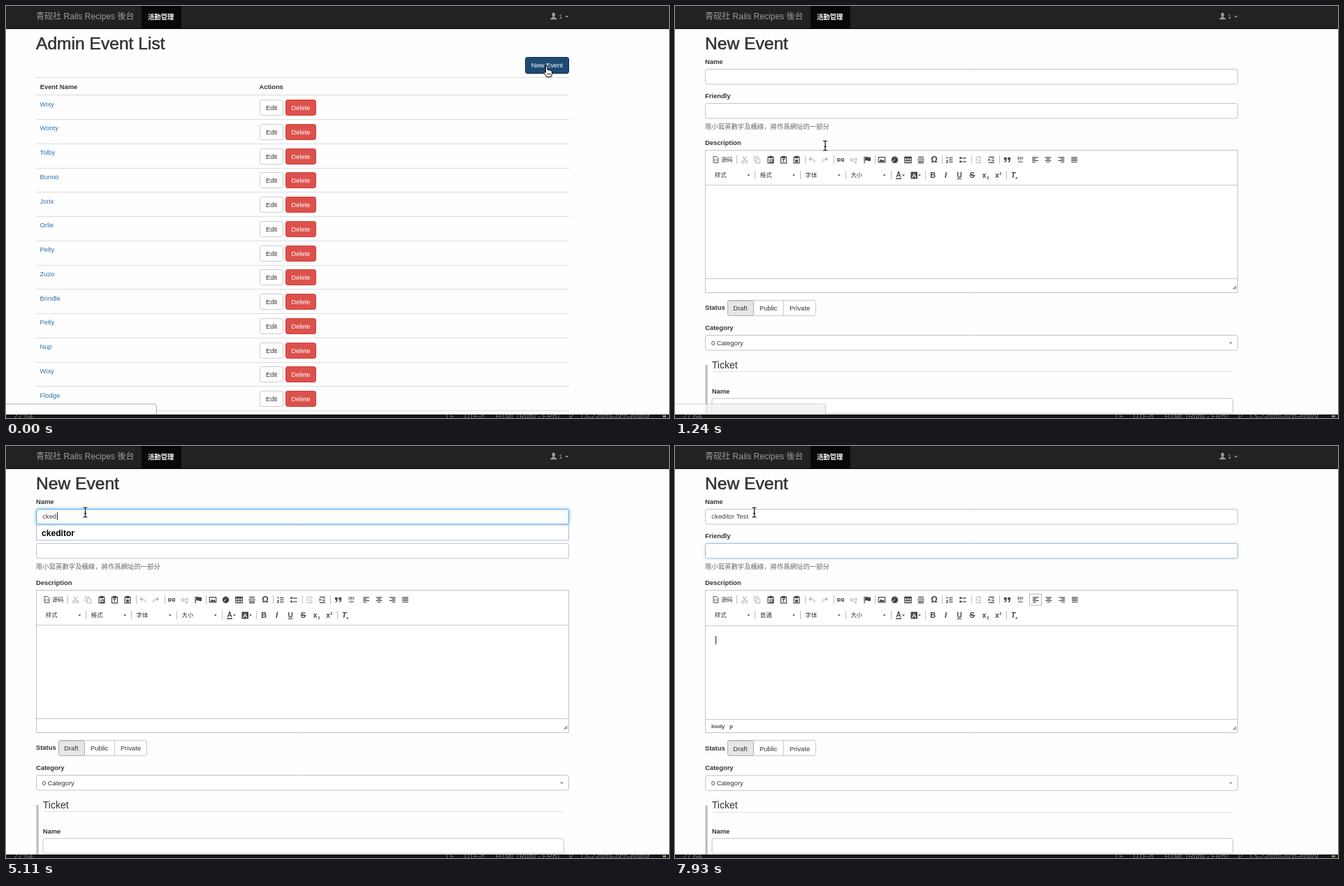
An HTML page with a canvas for the animation above (8 s loop, 949 px wide and 590 px high).

```html
<!DOCTYPE html>
<html lang="zh">
<head>
<meta charset="utf-8">
<title>Admin event form</title>
<style>
html, body { margin: 0; width: 100%; height: 100%; overflow: hidden; background: #fefefe; }
canvas { display: block; width: 949px; height: 590px; }
</style>
</head>
<body>
<canvas id="stage" width="949" height="590"></canvas>
<script>
const ctx = document.getElementById('stage').getContext('2d');
const LOOP = 8000;
const FONT = '"Liberation Sans", "Noto Sans CJK SC", "Noto Sans CJK", sans-serif';
const BODY = 9.37;
const INK = '#333', LINE = '#c8c8c8';

const NAMES = ['Wixy', 'Wonty', 'Tolby', 'Bunno', 'Jorix', 'Orlie', 'Pelty',
  'Zuzo', 'Brindle', 'Pelty', 'Nup', 'Wixy', 'Flodge'];

// Timed states: each holds until the next one starts.
const CURSOR = [
  [0, 'hand', 773, 86], [150, 'arrow', 773, 86], [800, 'arrow', 700, 98],
  [950, 'arrow', 480, 128], [1100, 'beam', 283, 152], [1240, 'beam', 215, 200],
  [1390, 'beam', 150, 255], [1540, 'beam', 123, 280], [1990, 'beam', 118, 235],
  [2140, 'beam', 110, 150], [2280, 'arrow', 103, 80], [2430, 'beam', 113.5, 95]
];
const TYPED = [[0, ''], [4070, 'ck'], [4960, 'cke'], [5110, 'cked'], [5410, 'ckedi'],
  [5560, 'ckedit'], [5710, 'ckedito'], [5860, 'ckeditor'], [6160, 'ckeditor '],
  [6750, 'ckeditor T'], [6900, 'ckeditor Te'], [7050, 'ckeditor Tes'], [7190, 'ckeditor Test']];
const NAME_FOCUS = [[0, 0], [2730, .5], [2880, 1], [7490, .45], [7640, 0]];
const FRIENDLY_FOCUS = [[0, 0], [7490, .5], [7640, 1], [7930, .3]];
const STATUS_ALPHA = [[0, 1], [1240, .6], [1390, .25], [1540, 0]];
const CARET = [[0, 0], [2730, 1], [3180, 0], [3620, 1], [4520, 0], [4960, 1], [6600, 0], [6750, 1], [7490, 0]];

const at = (list, t) => list.filter(s => s[0] <= t).pop();

function rect(x, y, w, h, color) {
  ctx.fillStyle = color;
  ctx.fillRect(x, y, w, h);
}

function box(x, y, w, h, fill, edge, r = 2.7) {
  ctx.beginPath();
  ctx.roundRect(x + .5, y + .5, w - 1, h - 1, r);
  ctx.fillStyle = fill;
  ctx.fill();
  ctx.strokeStyle = edge;
  ctx.lineWidth = 1;
  ctx.stroke();
}

function text(str, x, y, color = INK, size = BODY, weight = 400, align = 'left') {
  ctx.font = `${weight} ${size}px ${FONT}`;
  ctx.textAlign = align;
  ctx.fillStyle = color;
  ctx.fillText(str, x, y);
}

const label = (str, x, y) => text(str, x, y, INK, BODY, 700);

function shape(d, fill, stroke, width = 1) {
  const p = new Path2D(d);
  if (fill) { ctx.fillStyle = fill; ctx.fill(p); }
  if (stroke) { ctx.strokeStyle = stroke; ctx.lineWidth = width; ctx.stroke(p); }
}

function placed(x, y, draw) {
  ctx.save();
  ctx.translate(x, y);
  draw();
  ctx.restore();
}

const caretDown = (x, y, color, r = 2.6) =>
  placed(x, y, () => shape(`M${-r},${-r / 2}H${r}L0,${r / 2}Z`, color));

function heading(str) {
  text(str, 43, 62, INK, 24.6);
  ctx.strokeStyle = INK;
  ctx.lineWidth = .55;
  ctx.strokeText(str, 43, 62);
}

function navbar() {
  rect(0, 0, 949, 33, '#222');
  rect(0, 32, 949, 1, '#080808');
  text('青砚社 Rails Recipes 後台', 43, 19.3, '#9d9d9d', 12.05);
  rect(194, 0, 57, 32, '#080808');
  text('活動管理', 203, 18.5, '#fff', BODY, 700);
  placed(783.8, 14.5, () => shape(
    'M-2.3,-2.5Q-2.3,-5 0,-5T2.3,-2.5Q2.2,-.5 1.1,.7V1.6L4.6,3.4V4.8H-4.6V3.4L-1.1,1.6V.7Q-2.2,-.5 -2.3,-2.5Z', '#9d9d9d'));
  text('1', 791.3, 18.3, '#9d9d9d');
  caretDown(802.7, 15.5, '#9d9d9d');
}

function footer() {
  rect(0, 585, 949, 5, '#141416');
  ctx.save();
  ctx.beginPath();
  ctx.rect(0, 585, 949, 5);
  ctx.clip();
  const c = '#74777c';
  text('27:64', 11, 591, c, 11);
  text('LF', 630, 591, c, 10.2);
  text('UTF-8', 656, 591, c, 10.2);
  text('HTML (Ruby - ERB)', 701, 591, c, 10.2);
  placed(809, 588, () => shape('M-2,-4V4M2,-3V-1L-2,2', null, c));
  text('13-2-html-rich-editor', 821, 591, c, 11.2);
  rect(940, 586, 5, 3, '#8a8468');
  ctx.restore();
}

function listPage() {
  heading('Admin Event List');
  box(743, 73, 63, 24, '#1d4b75', '#122b40');
  text('New Event', 774.5, 88.3, '#fff', BODY, 400, 'center');
  rect(43, 102, 763, 1, '#ddd');
  label('Event Name', 48.7, 118.5);
  label('Actions', 362.5, 118.5);
  rect(43, 127, 763, 1, '#d8d8d8');
  NAMES.forEach((name, i) => {
    const y = 34.75 * i;
    text(name, 48.5, 143.5 + y, '#2c6fb0');
    box(363, Math.round(134 + y), 34, 23, '#fff', '#ccc');
    text('Edit', 380, 149 + y, INK, BODY, 400, 'center');
    box(400, Math.round(134 + y), 44, 23, '#dc514c', '#d43f3a');
    text('Delete', 422, 149 + y, '#fff', BODY, 400, 'center');
    rect(43, Math.round(162 + y), 763, 1, '#ddd');
  });
}

function input(x, y, w, focus = 0) {
  const mix = (a, b) => Math.round(a + (b - a) * focus);
  ctx.save();
  if (focus) {
    ctx.shadowColor = `rgba(102,175,233,${.7 * focus})`;
    ctx.shadowBlur = 5;
  }
  box(x, y, w, 22.5, '#fff', `rgb(${mix(196, 90)},${mix(196, 170)},${mix(196, 233)})`);
  ctx.restore();
}

const bars = (left, widths, top = -3.5, gap = 2.3) =>
  widths.map((w, i) => `M${left(w)},${top + i * gap}h${w}`).join('');
const ring = x => `M${x + 1.6},3a1.6,1.6 0 1 0 -3.2,0a1.6,1.6 0 1 0 3.2,0`;
const CLIP = 'M-4,-4H4V4.5H-4ZM-2,-5H2V-3H-2Z';
const INDENT = 'M-4,-4H4M0,-1.3H4M0,1.3H4M-4,4H4';
const COMMA = 'h3.8v3.2q0,3 -3,4v-1.6q1.3,-.6 1.3,-2.2h-2.1z';

// Toolbar glyphs as [stroke path, fill path], centred on the origin.
const ICONS = {
  cut: ['M-3,-5L2,1.8M3,-5L-2,1.8' + ring(-2.7) + ring(2.7)],
  copy: ['M-1,2H-4V-4.5H1V-3M-1,-2H2.5L4,0V4.5H-1Z'],
  paste: [CLIP + 'M-1,0H3V3.5H-1Z', 'M-2,-5H2V-3H-2Z'],
  pasteText: [CLIP + 'M-2,-1H2M0,-1V3', 'M-2,-5H2V-3H-2Z'],
  pasteWord: [CLIP + 'M-2,-.5L-1,3L0,0L1,3L2,-.5', 'M-2,-5H2V-3H-2Z'],
  undo: ['M4.5,3.5Q3.5,-1 -2,-1', 'M-5,-1L-1,-4.3V2.3Z'],
  redo: ['M-4.5,3.5Q-3.5,-1 2,-1', 'M5,-1L1,-4.3V2.3Z'],
  link: ['M-.8,-1.8H-4.3V1.8H-.8M.8,-1.8H4.3V1.8H.8M-2.5,0H2.5'],
  unlink: ['M-.8,-1.8H-4.3V1.8H-.8M.8,-1.8H4.3V1M-2.5,0H2.5M1,2L4,5M4,2L1,5'],
  flag: [null, 'M-4.5,-4.8H-3.3V5H-4.5ZM-2.8,-4Q-.5,-5 1,-4T5,-4V1.4Q3,2.4 1,1.3T-2.8,1.4Z'],
  image: ['M-4.7,-3.7H4.7V3.7H-4.7Z', 'M-4,3L-1.3,-1L.7,1L2.3,-.5L4,3Z'],
  flash: [null, 'M4.8,0A4.8,4.8 0 1 0 -4.8,0A4.8,4.8 0 1 0 4.8,0ZM2.8,-3Q.5,-3 -.2,-.5T-2.8,3V1.6Q-1.6,1.5 -1.2,0T2.8,-3Z'],
  table: ['M-4.7,-4H4.7V4.3H-4.7ZM-1.6,-3V4M1.6,-3V4M-4.5,.8H4.5', 'M-5,-4.5H5V-2H-5Z'],
  rule: ['M-4,-4.3H4M-4,-2.3H4M-4.7,0H-2M-1.3,0H1.3M2,0H4.7M-4,2.3H4M-4,4.3H4'],
  numbers: ['M-.8,-3H4.5M-.8,0H4.5M-.8,3H4.5M-3.5,-4.5V-1.5M-4.5,1H-2.8L-4.3,4H-2.5'],
  bullets: ['M-1,-2.5H4.7M-1,2.5H4.7', 'M-4.7,-4H-2V-1.3H-4.7ZM-4.7,1.3H-2V4H-4.7Z'],
  outdent: [INDENT, 'M-5,0L-2,-2V2Z'],
  indent: [INDENT, 'M-1.5,0L-4.5,-2V2Z'],
  quote: [null, 'M-4.6,-3.5' + COMMA + 'M.8,-3.5' + COMMA],
  left: [bars(() => -4.3, [8.6, 5, 8.6, 5])],
  center: [bars(w => -w / 2, [8.6, 5, 8.6, 5])],
  right: [bars(w => 4.3 - w, [8.6, 5, 8.6, 5])],
  justify: [bars(() => -4.3, [8.6, 8.6, 8.6, 8.6])]
};
const ROW = [['cut', 99.5], ['copy', 117.5], ['paste', 137], ['pasteText', 155.5], ['pasteWord', 174],
  ['undo', 196], ['redo', 214.5], ['link', 237], ['unlink', 256], ['flag', 275], ['image', 296],
  ['flash', 314.5], ['table', 333.5], ['rule', 352], ['numbers', 393], ['bullets', 412],
  ['outdent', 434.5], ['indent', 453], ['quote', 475.5], ['left', 515.5], ['center', 534],
  ['right', 553], ['justify', 571.5]];
const DISABLED = ['cut', 'copy', 'undo', 'redo', 'unlink', 'outdent'];
const PALE = '#bdbdbd', DARK = '#444';

function toolbar(ready, editing) {
  const tone = ready ? DARK : PALE;
  placed(58.5, 220, () => shape('M-3.5,-4.5H1L3.5,-2V4.5H-3.5ZM-.8,-1L-2.2,.8L-.8,2.6M.8,-1L2.2,.8L.8,2.6', null, ready ? DARK : '#999', .9));
  text('源码', 66, 223, INK, 8.3);
  if (editing) box(507, 211.5, 18, 17, '#fff', '#b5b5b5', 0);
  for (const [name, x] of ROW) {
    const c = DISABLED.includes(name) ? PALE : tone;
    const [stroke, fill] = ICONS[name];
    placed(x + (editing && x > 510 ? .8 : 0), 220.3, () => {
      if (fill) { ctx.fillStyle = c; ctx.fill(new Path2D(fill), 'evenodd'); }
      if (stroke) shape(stroke, null, c, 1.15);
    });
  }
  text('Ω', 371, 224.2, tone, 12, 700, 'center');
  text('DIV', 494.3, 219.5, tone, 5, 700, 'center');
  text('</>', 494.3, 225, tone, 5, 700, 'center');
  for (const x of [88, 186, 227, 286, 382, 424, 464]) rect(x, 214, 1, 12, '#bbb');

  ['样式', editing ? '普通' : '格式', '字体', '大小'].forEach((name, i) => {
    const x = 57 + 64.8 * i;
    text(name, x, 244.8, INK, 8.4);
    caretDown(x + 48.3, 242.5, INK, 2);
  });
  for (const x of [114, 179, 244, 309, 358, 474]) rect(x, 236, 1, 12, '#bbb');
  text('A', 320, 245.3, DARK, 10, 700, 'center');
  rect(316, 246.5, 8, 1.5, DARK);
  caretDown(327, 242.5, INK, 2);
  rect(337.5, 237.5, 9.5, 10, DARK);
  text('A', 342.3, 245.6, '#fff', 9, 700, 'center');
  caretDown(350, 242.5, INK, 2);

  const styled = (str, x, font) => {
    ctx.font = `${font} ${FONT}`;
    ctx.textAlign = 'center';
    ctx.fillStyle = tone;
    ctx.fillText(str, x, 246);
  };
  styled('B', 369.3, '700 11px');
  styled('I', 387.5, 'italic 700 11px');
  styled('U', 407, '700 10px');
  rect(403.5, 247, 7, 1, tone);
  styled('S', 425.5, '700 11px');
  rect(421.5, 242, 8, 1, tone);
  styled('x', 442.5, '700 10px');
  text('2', 446.2, 248, tone, 5.5, 700);
  styled('x', 461, '700 10px');
  text('2', 464.3, 241.5, tone, 5.5, 700);
  styled('T', 484, 'italic 700 11px');
  text('x', 487, 248, tone, 6, 700);
}

const textCaret = (x, y, h = 11) => rect(x, y, 1, h, '#222');

function formPage(t) {
  const editing = t >= 7930;
  const dy = editing ? .7 : 0;
  heading('New Event');
  label('Name', 43, 83);
  input(43, 90, 763, at(NAME_FOCUS, t)[1]);
  label('Friendly', 43, 132);
  input(43, 139, 763, at(FRIENDLY_FOCUS, t)[1]);
  text('限小寫英數字及橫線，將作爲網址的一部分', 43, 175.8, '#666');
  label('Description', 43, 199);

  box(43, 206, 763, 205, '#fff', '#c2c2c2', 0);
  const split = editing ? 1 : 0;
  rect(44, 256 + split, 761, 1, LINE);
  rect(44, 390 + split, 761, 1, LINE);
  shape(`M803.5,${399.5 + split}V${405.5 + split}H797.5Z`, '#a5a5a5');
  if (t >= 320) toolbar(t >= 650, editing);
  if (editing) {
    textCaret(58, 272, 12);
    text('body', 52, 404, '#484848', 8.1, 700);
    text('p', 78, 404, '#484848', 8.1, 700);
  }

  label('Status', 43, 435 + dy);
  box(75, 421, 127, 23, '#fff', LINE);
  box(75, 421, 38, 23, '#e6e6e6', '#adadad');
  rect(77, 422, 35, 1.5, '#d5d5d5');
  rect(155, 422, 1, 21, LINE);
  text('Draft', 83.2, 435.8 + dy);
  text('Public', 121, 435.8 + dy);
  text('Private', 164, 435.8 + dy);
  label('Category', 43, 463.7 + dy);
  input(43, 471 + dy / 2, 763);
  text('0 Category', 52, 485.8 + dy / 2);
  caretDown(795.5, 482.7, '#888');

  rect(43.5, 514 + dy, 3, 72, '#b9b9b9');
  text('Ticket', 52.7, 518.7 + dy, INK, 14.05);
  rect(53, 523 + split, 746, 1, '#e3e3e3');
  label('Name', 52.7, 554.5);
  input(52.5, 561.5, 746.5);

  const typed = at(TYPED, t)[1];
  text(typed, 52.3, 104.3, '#444');
  const end = 52.5 + ctx.measureText(typed).width;
  if (at(CARET, t)[1]) textCaret(Math.round(end + .3), 95);
  if (t >= 7490 && !editing) textCaret(53, 145);
  if (t >= 6160 && t < 7490)
    for (let x = 52; x < 86; x += 2) rect(x, 105 + (x / 2) % 2 * .7, 1.3, 1, '#e0392f');
  if (t >= 4070 && t < 6160) {
    box(43, 112.5, 763, 23, '#fff', '#9dbfe6', 0);
    text('ckeditor', 51, 129, '#000', 12.1, 700);
  }
}

function statusBubble(t) {
  ctx.globalAlpha = at(STATUS_ALPHA, t)[1];
  ctx.beginPath();
  ctx.roundRect(-3, 570, 218.5, 20, 3);
  ctx.fillStyle = '#fdfdfd';
  ctx.fill();
  if (t >= 150) rect(43, 571, 172, 14, '#eee');
  ctx.strokeStyle = '#aaa';
  ctx.lineWidth = 1;
  ctx.stroke();
  ctx.globalAlpha = 1;
}

function cursor(kind, x, y) {
  placed(x, y, () => {
    ctx.lineJoin = 'round';
    if (kind === 'arrow') {
      shape('M0,0V12L2.8,9.5L4.8,14L6.8,13.1L4.9,8.8H8.6Z', '#000', '#fff');
    } else if (kind === 'hand') {
      shape('M-.5,1Q.8,-.6 2,1V5.5Q3.3,4.6 4.3,6Q5.7,5.2 6.4,6.7Q8.2,6.2 8.6,8V11.5L7.2,15.5H.8L-2.6,10.3Q-3.4,8.4 -1.8,8.3L-.5,9.5Z', '#fff', '#000');
      shape('M2.3,10V13M4.2,10V13M6.1,10V13', null, '#000', .7);
    } else {
      const d = 'M-3,-7Q0,-7 0,-5.5Q0,-7 3,-7M0,-5.5V5.5M-3,7Q0,7 0,5.5Q0,7 3,7M-1.7,1.5H1.7';
      shape(d, null, 'rgba(255,255,255,.8)', 2.4);
      shape(d, null, '#111', 1.2);
    }
  });
}

function draw(t) {
  rect(0, 0, 949, 590, '#fefefe');
  navbar();
  if (t < 150) listPage(); else formPage(t);
  statusBubble(t);
  footer();
  const [, kind, x, y] = at(CURSOR, t);
  cursor(kind, x, y);
}

const start = performance.now();
function tick() {
  draw((performance.now() - start) % LOOP);
  requestAnimationFrame(tick);
}
tick();
</script>
</body>
</html>
```
